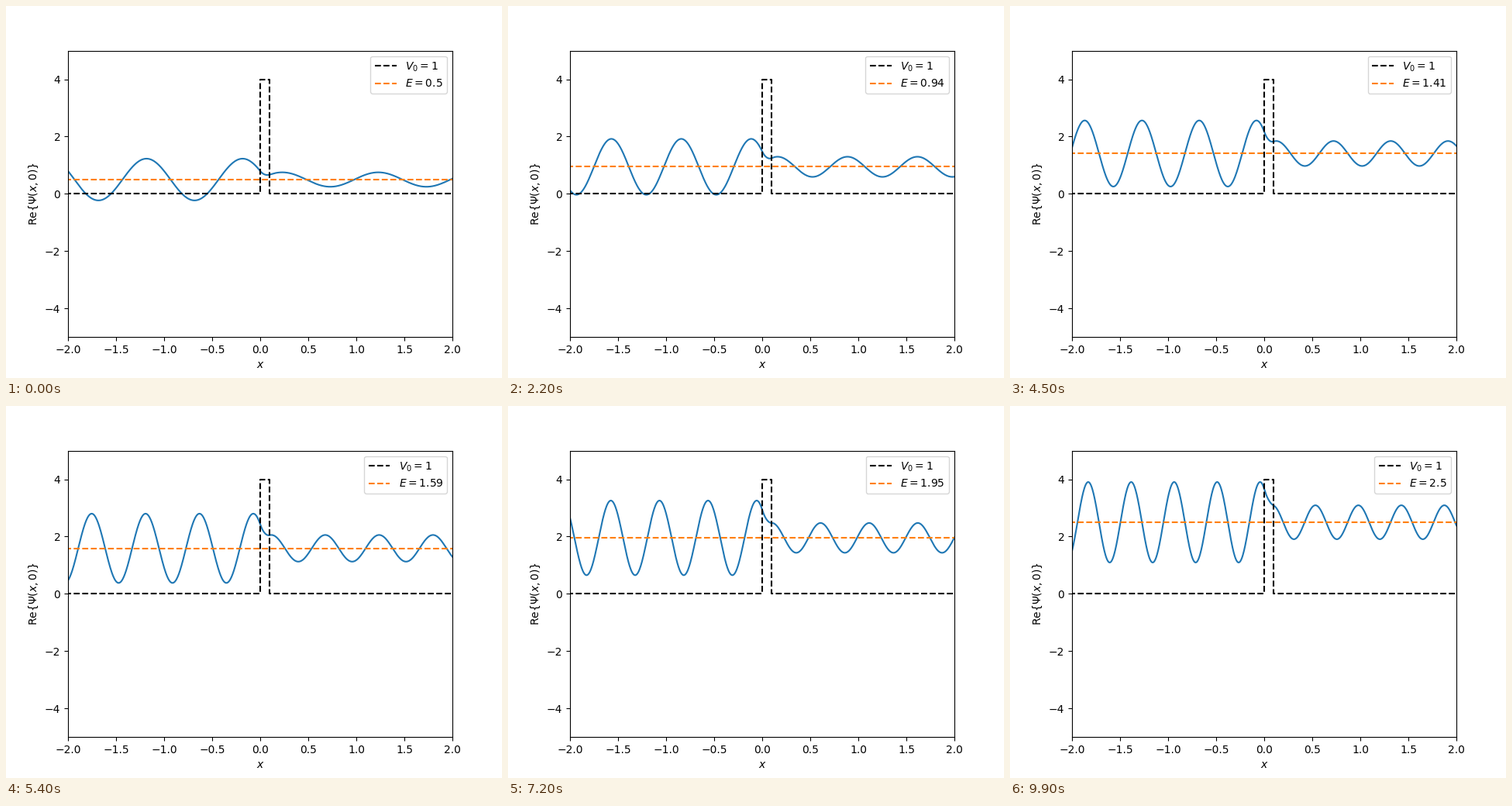
Recreate the animation shown at these times as a matplotlib script. Size 640x480 px, loop 10 s.

```python
import numpy as np
import matplotlib.pyplot as plt
from matplotlib.animation import FuncAnimation

# Plane wave meeting a rectangular barrier, units with h = m = 1
V = 4.0
WIDTH = 0.1
FRAMES = 100
energies = np.linspace(0.5, 2.5, FRAMES)
x = np.linspace(-2, 2, 1000)


def wave(E):
    """Real part of the stationary scattering state at energy E < V."""
    k = 2 * np.pi * np.sqrt(2 * E)
    q = 2 * np.pi * np.sqrt(2 * (V - E))
    sh, ch = np.sinh(q * WIDTH), np.cosh(q * WIDTH)
    out = 1 / (ch - 1j * (k**2 - q**2) / (2 * k * q) * sh)
    back = -1j * (k**2 + q**2) / (2 * k * q) * sh * out

    d = x - WIDTH
    left = np.exp(1j * k * x) + back * np.exp(-1j * k * x)
    dc = np.clip(d, -WIDTH, 0)
    inside = out * (np.cosh(q * dc) + 1j * k / q * np.sinh(q * dc))
    right = out * np.exp(1j * k * d)
    return np.where(x < 0, left, np.where(d < 0, inside, right)).real


fig, ax = plt.subplots(figsize=(6.4, 4.8), dpi=100)
ax.set_xlim(-2, 2)
ax.set_ylim(-5, 5)
ax.set_xlabel(r"$x$")
ax.set_ylabel(r"Re$\{\Psi(x,0)\}$")

psi_line, = ax.plot([], [], color="C0")
ax.plot([-10, 0, 0, WIDTH, WIDTH, 10], [0, 0, V, V, 0, 0], "k--",
        label=r"$V_0 = 1$")
e_line, = ax.plot([], [], "--", color="C1")


def update(i):
    E = energies[i]
    psi_line.set_data(x, E + wave(E))
    e_line.set_data([-10, 10], [E, E])
    e_line.set_label(f"$E = {round(float(E), 2)}$")
    ax.legend(loc="upper right")
    return psi_line, e_line


anim = FuncAnimation(fig, update, frames=FRAMES, interval=100,
                     repeat=True, repeat_delay=0, blit=False)
plt.show()
```
